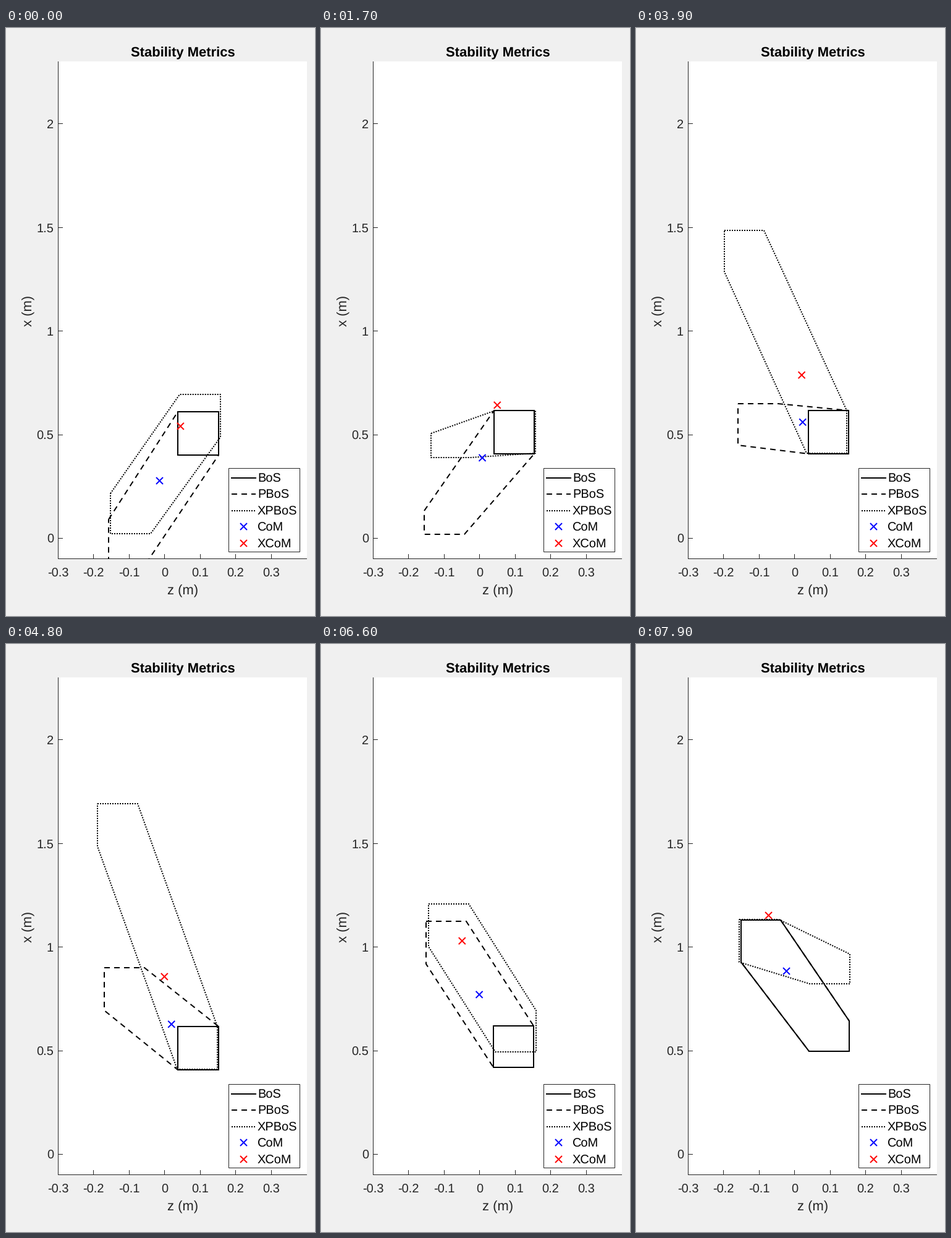
These frames come from a looping animation (500 by 950 pixels, 8000 ms). A matplotlib script:

```python
import numpy as np
import matplotlib.pyplot as plt
from matplotlib.animation import FuncAnimation
from matplotlib.patches import Rectangle

W, H, DPI = 500, 950, 100
FRAMES, STEP = 80, 100
START, END = 0.4, 7.9     # the first pose stands until START (s)
LANDING = 7.2             # both feet on the ground from here (s)
REACH = 3.05              # extrapolation: position + REACH * velocity
PT = 72 / DPI             # points per pixel
INK = "#262626"

plt.rcParams.update({"font.family": "Liberation Sans", "path.snap": False,
                     "text.hinting": "none"})


def path(*keys):
    """Cubic through keys (t, x, y, vx, vy)."""
    keys = np.array(keys, float)
    times = keys[:, 0]

    def at(t):
        k = np.clip(np.searchsorted(times, t) - 1, 0, len(times) - 2)
        a, b = keys[k], keys[k + 1]
        h = b[0] - a[0]
        s = (t - a[0]) / h
        return ((1 + 2 * s) * (1 - s) ** 2 * a[1:3] + s * (1 - s) ** 2 * h * a[3:]
                + s * s * (3 - 2 * s) * b[1:3] + s * s * (s - 1) * h * b[3:])
    return at


def ahead(place, t, h=0.01):
    return place(t) + REACH * (place(t + h) - place(t - h)) / (2 * h)


com = path((0.4, 248.5, 731.5, 11.1, -28.9), (3.0, 268.5, 659.5, 3.3, -25.6),
           (5.8, 262.5, 588.5, -6.6, -26.6), (7.9, 243.5, 528.5, -9.5, -29.5))

swing_heel = path((0.4, 166, 859.5, 1, -14), (1.7, 167, 818, 3.6, -40.7),
                  (3.0, 168, 749.5, 3.1, -70.7), (4.8, 159, 592, -3.6, -86.9),
                  (5.8, 164, 526, 2.8, -33.3), (6.6, 170.5, 517, 1.1, -9.5),
                  (7.9, 170, 514.5, -1, -0.3))


def swing_size(t):
    """The foot looks shorter while it is pitched after push-off."""
    return 64.5, 69 - 33 * np.exp(-((t - 2) / 1.1) ** 2)


def lift(t):
    return 29.5 * (max(t - 5, 0) / (END - 5)) ** 3.5


def stance_heel(t):
    settle = 2 * np.exp(-4.6 * (t - START))
    return np.array([279 + np.sin(1.1 * (t - 0.9)), 687.5 + settle - lift(t)])


def stance_size(t):
    return 65.5, 69.5 - 0.7 * lift(t)


def corners(heel, size):
    (x, y), (w, h) = heel, size
    return [(x + a, y - b) for a in (0, w) for b in (0, h)]


def hull(points):
    """Convex outline, closed, on whole pixels."""
    pts = sorted({(round(x), round(y)) for x, y in points})

    def chain(seq):
        out = []
        for p in seq:
            while len(out) > 1:
                (ox, oy), (qx, qy) = out[-2:]
                if (qx - ox) * (p[1] - oy) - (qy - oy) * (p[0] - ox) > 0:
                    break
                out.pop()
            out.append(p)
        return out

    return np.array(chain(pts)[:-1] + chain(pts[::-1]))


fig = plt.figure(figsize=(W / DPI, H / DPI), dpi=DPI, facecolor="#f0f0f0")
ax = fig.add_axes([0, 0, 1, 1])
ax.set_xlim(0, W)
ax.set_ylim(H, 0)
ax.axis("off")


def label(x, y, s, size=20, ha="center", color=INK, **kw):
    ax.text(x, y, s, fontsize=size * PT, ha=ha, va="baseline", color=color, **kw)


def rule(xs, ys):
    ax.plot(xs, ys, color=INK, lw=PT, solid_capstyle="butt", zorder=1)


def outline(style, z, xs=(), ys=()):
    return ax.plot(xs, ys, color="black", lw=2 * PT, ls=style, zorder=z,
                   dash_capstyle="butt", solid_capstyle="projecting",
                   solid_joinstyle="miter")[0]


def cross_points(x, y, r=5.5):
    return [x - r, x + r, np.nan, x - r, x + r], [y - r, y + r, np.nan, y + r, y - r]


def cross(color, z, x=0, y=0):
    return ax.plot(*cross_points(x, y), color=color, lw=2 * PT, zorder=z,
                   solid_capstyle="butt")[0]


# Plot area, ticks and titles
area = Rectangle((84, 54), 403, 804, fc="white", ec="none", zorder=0)
ax.add_patch(area)
rule([84.5, 84.5], [54, 858])
rule([84, 487], [857.5, 857.5])
for k in range(7):
    x = int(84 + 57.5 * k) + 0.5
    rule([x, x], [850, 857])
    label(x, 887, f"{(k - 3) / 10:g}")
for k in range(5):
    y = int(824.6 - 167.5 * k) + 0.5
    rule([85, 92], [y, y])
    label(77, y + 7.3, f"{k / 2:g}", ha="right")
label(286, 46, "Stability Metrics", 22, weight="bold", color="black")
label(286, 915, "z (m)", 22)
label(42, 456.5, "x (m)", 22, rotation=90, rotation_mode="anchor")

# Moving parts
DASH, DOT = (0, (4.5, 3.5)), (0, (1, 1))
bos, pbos, xpbos = (outline(s, z) for z, s in enumerate(("-", DASH, DOT), 3))
com_mark, xcom_mark = cross("blue", 6), cross("red", 7)
moving = [bos, pbos, xpbos, com_mark, xcom_mark]
for part in moving:
    part.set_clip_path(area)

# Legend
ax.add_patch(Rectangle((360.5, 711.5), 115, 135, fc="white", ec=INK,
                       lw=PT, zorder=8))
for k, (name, style) in enumerate([("BoS", "-"), ("PBoS", DASH), ("XPBoS", DOT),
                                   ("CoM", "blue"), ("XCoM", "red")]):
    y = int(727 + 26.5 * k)
    if k < 3:
        outline(style, 9, [365, 404], [y, y])
    else:
        cross(style, 9, 384.5, y - 0.5)
    label(407, y + 7, name, ha="left", color="black", zorder=9)


def draw(i):
    t = max(i * STEP / 1000, START)
    ground = corners(stance_heel(t), stance_size(t))
    both = hull(ground + corners(swing_heel(t), swing_size(t)))
    bos.set_data(*(both if t >= LANDING else hull(ground)).T)
    pbos.set_data(*both.T)
    xpbos.set_data(*hull(corners(ahead(stance_heel, t), stance_size(t))
                         + corners(ahead(swing_heel, t), swing_size(t))).T)
    com_mark.set_data(*cross_points(*com(t)))
    xcom_mark.set_data(*cross_points(*ahead(com, t)))
    return moving


anim = FuncAnimation(fig, draw, frames=FRAMES, interval=STEP, repeat=True,
                     repeat_delay=0, init_func=lambda: draw(0))
plt.show()
```
